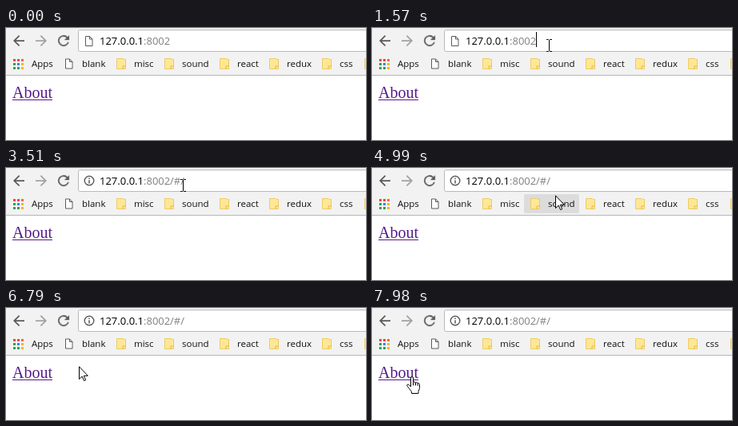
Animation of 450 by 141 pixels, one loop 8000 ms. Source, as an HTML page:

```html
<!DOCTYPE html>
<html lang="en">
<head>
<meta charset="utf-8">
<title>Browser navigation</title>
<style>
html, body { margin: 0; height: 100%; overflow: hidden; background: #fff; }
svg { display: block; width: 100vw; height: 100vh; }
.url { font: 13px "Open Sans", "Noto Sans", sans-serif; }
.marks { font: 11.5px "Open Sans", "Noto Sans", sans-serif; }
.link { font: 20px "Liberation Serif", "Times New Roman", serif; }

.before, .after, .caret, .reload, .stop, .page, .hover,
.cursor, .arrow, .beam, .hand { animation: 8s step-end infinite; }
.before { animation-name: before; }
.after { animation-name: after; }
.caret { animation-name: caret; }
.reload { animation-name: reload; }
.stop { animation-name: stop; }
.page { animation-name: page; }
.hover { animation-name: hover; animation-timing-function: linear; }
.cursor { animation-name: move; }
.arrow { animation-name: arrow; }
.beam { animation-name: beam; }
.hand { animation-name: hand; }

/* 1% = 80 ms */
@keyframes before { 0% { opacity: 1 } 40.875%, 100% { opacity: 0 } }
@keyframes after { 0% { opacity: 0 } 40.875%, 100% { opacity: 1 } }
@keyframes caret {
  0%, 25.5%, 35.125%, 100% { opacity: 0 }
  18.625%, 32.25% { opacity: 1 }
}
@keyframes reload { 0%, 43.875%, 100% { opacity: 1 } 35.125% { opacity: 0 } }
@keyframes stop { 0%, 43.875%, 100% { opacity: 0 } 35.125% { opacity: 1 } }
@keyframes page { 0%, 40.875%, 100% { opacity: 1 } 39% { opacity: 0 } }
@keyframes hover {
  0%, 9.625%, 14.625%, 57.5%, 66.375%, 100% { opacity: 0 }
  10.625% { opacity: .32 }
  12.625% { opacity: .6 }
  59.375%, 64.375% { opacity: 1 }
}
@keyframes arrow {
  0%, 16.625%, 78%, 96.875%, 100% { opacity: 0 }
  5.625%, 57.5%, 79% { opacity: 1 }
}
@keyframes beam {
  0%, 57.5%, 79%, 100% { opacity: 0 }
  16.625%, 78% { opacity: 1 }
}
@keyframes hand { 0% { opacity: 0 } 96.875%, 100% { opacity: 1 } }
@keyframes move {
  0% { transform: translate(300px, 104px) }
  5.625% { transform: translate(300px, 104px); animation-timing-function: steps(5) }
  10.625% { transform: translate(235px, 44px); animation-timing-function: steps(4) }
  14.625% { transform: translate(223px, 16px) }
  15.625% { transform: translate(221px, 15px) }
  16.625% { transform: translate(222px, 20px) }
  17.625% { transform: translate(222px, 21px) }
  18.625% { transform: translate(221px, 21px) }
  19.625% { transform: translate(221px, 22px) }
  55.5% { transform: translate(223px, 25px) }
  56.5% { transform: translate(226px, 28px) }
  57.5% { transform: translate(229px, 31px) }
  58.5% { transform: translate(229px, 34px) }
  59.375% { transform: translate(229px, 35px) }
  62.375% { transform: translate(229px, 34px) }
  63.375% { transform: translate(229px, 32px) }
  64.375% { transform: translate(229px, 31px) }
  66.375% { transform: translate(229px, 30px) }
  78% { transform: translate(226px, 27px) }
  79% { transform: translate(211px, 31px); animation-timing-function: steps(6) }
  84.875% { transform: translate(91px, 73px); animation-timing-function: steps(2) }
  86.875% { transform: translate(107px, 79px) }
  87.875% { transform: translate(120px, 81px) }
  88.875% { transform: translate(136px, 87px) }
  89.875% { transform: translate(144px, 94px); animation-timing-function: steps(6) }
  95.875% { transform: translate(72px, 88px) }
  96.875% { transform: translate(48px, 87px) }
  97.875% { transform: translate(44px, 86px) }
  99.75%, 100% { transform: translate(43px, 86px) }
}
</style>
</head>
<body>
<svg viewBox="0 0 450 141">
  <defs>
    <path id="back" d="M20 11H7.83l5.59-5.59L12 4l-8 8 8 8 1.41-1.41L7.83 13H20z"/>
    <g id="folder">
      <path d="M.5.5h8l1 1h2v12H.5z" fill="#ffe796" stroke="#eccb66"/>
      <path d="M8 13.5v-3.5h3.5" fill="none" stroke="#dfb746"/>
    </g>
    <path id="doc" d="M.5.5h5l3.500 3.500v8.500h-8.500zM5.500.5v3.500h3.500" fill="#fff" stroke="#5a5a5a"/>
  </defs>

  <rect width="450" height="141" fill="#fff"/>
  <rect width="450" height="59" fill="#f2f2f2"/>
  <rect y="59" width="450" height="1" fill="#b6b6b6"/>

  <g fill="#5a5a5a">
    <use href="#back" transform="translate(5.500 5.500) scale(.875)"/>
    <use href="#back" transform="translate(54.500 5.500) scale(-.875 .875)" fill="#a2a2a2"/>
    <path class="reload" transform="translate(61.500 5.500) scale(.875)" d="M17.65 6.35A8 8 0 1 0 19.730 14h-2.080A6 6 0 1 1 16.220 7.780L13 11h7V4z"/>
  </g>
  <path class="stop" d="M67 11l10 10M77 11l-10 10" stroke="#5a5a5a" stroke-width="2"/>

  <rect x="90.5" y="2.5" width="380" height="27" rx="2" fill="#fff" stroke="#b9b9b9"/>
  <g class="before"><use href="#doc" x="99" y="10"/></g>
  <g class="after">
    <circle cx="104" cy="16" r="5.800" fill="none" stroke="#5a5a5a" stroke-width="1.400"/>
    <path d="M104 12.500v1.600M104 15.200v4.300" stroke="#5a5a5a" stroke-width="1.500"/>
  </g>
  <text class="url" x="117" y="21">127.0.0.1<tspan fill="#808080">:8002<tspan class="after-text"></tspan></tspan></text>
  <text class="url after" x="205" y="21" fill="#808080">/#/</text>
  <rect class="caret" x="205" y="5" width="1" height="19"/>

  <rect class="hover" x="190" y="33" width="69" height="24" rx="2" fill="#dcdcdc"/>
  <g stroke-width="3" stroke-dasharray="3 2">
    <path d="M9 40.500h8" stroke="#e84c3d"/>
    <path d="M19 40.500h3" stroke="#ee6b3b"/>
    <path d="M9 45.500h3" stroke="#2fa05a"/>
    <path d="M14 45.500h3" stroke="#4285d8"/>
    <path d="M19 45.500h3" stroke="#f2b62c"/>
    <path d="M9 50.500h8" stroke="#2fa05a"/>
    <path d="M19 50.500h3" stroke="#f2b62c"/>
  </g>
  <use href="#doc" x="74" y="38.500"/>
  <use href="#folder" x="138" y="38"/>
  <use href="#folder" x="198" y="38"/>
  <use href="#folder" x="267" y="38"/>
  <use href="#folder" x="329" y="38"/>
  <use href="#folder" x="395" y="38"/>
  <use href="#folder" x="448" y="38"/>
  <g class="marks" fill="#111">
    <text x="32" y="49">Apps</text>
    <text x="95" y="49">blank</text>
    <text x="160" y="49">misc</text>
    <text x="220" y="49">sound</text>
    <text x="289" y="49">react</text>
    <text x="351" y="49">redux</text>
    <text x="417" y="49">css</text>
  </g>

  <g class="page" fill="#551a8b">
    <text class="link" x="8" y="88">About</text>
    <rect x="8" y="90" width="50" height="1"/>
  </g>

  <g class="cursor">
    <path class="arrow" d="M.5.8v15.800l3.700-3.500 2.400 5.500 2.100-.9-2.400-5.400h5z" fill="#fff" stroke="#000"/>
    <path class="beam" d="M-3 -7.500h2.500l1 1 1-1h2.500M.5-6.500v13M-3 7.500h2.500l1-1 1 1h2.500" fill="none" stroke="#000"/>
    <g class="hand" stroke="#000" stroke-linejoin="round">
      <path d="M5.500 13V2.100a1.500 1.500 0 0 1 3 0V7.500c.6-.9 2.600-.7 3 .6 .7-.8 2.400-.5 2.700.8 .9-.6 2.300 0 2.300 1.400V14.500c0 2-1.500 3-1.500 5v2H6.500v-2C5.500 17.500 2 14 .8 11.700c-.5-1.300 1-2.100 2-1.200z" fill="#fff"/>
      <path d="M8.500 7.500v4M11.500 8v3.500M14.200 9v3" fill="none"/>
    </g>
  </g>
</svg>
</body>
</html>
```
